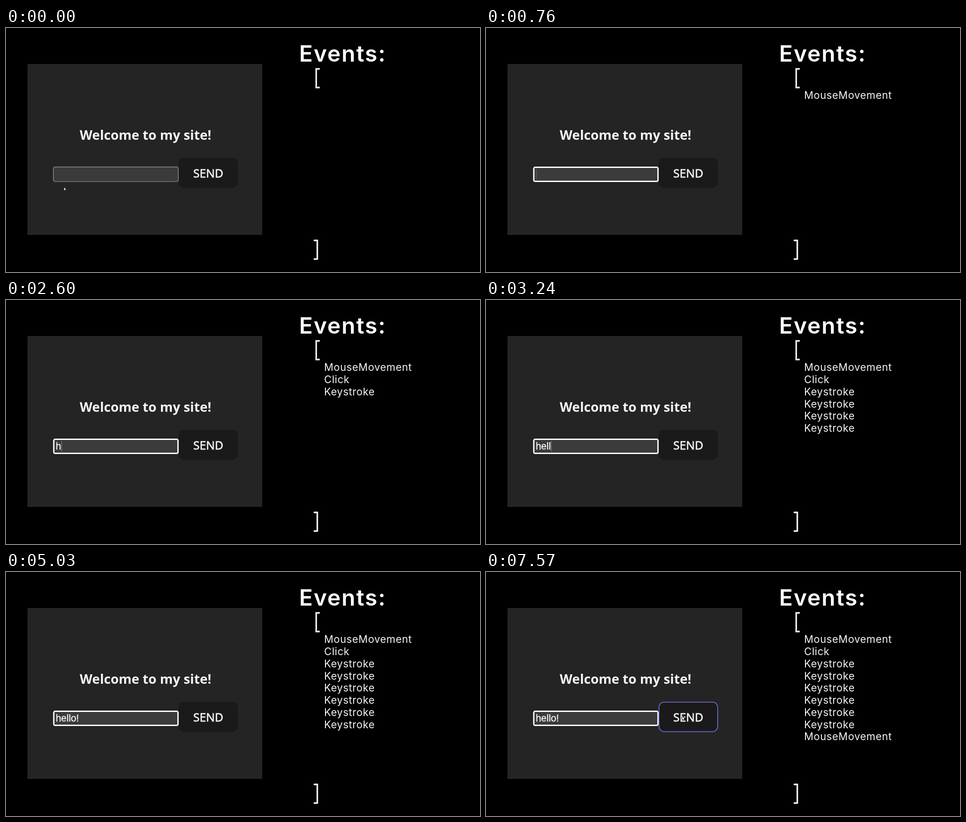
Recreate the animation shown at these times as an HTML page with a canvas. Size 1043 by 537 pixels, loop 8 s.

```html
<!DOCTYPE html>
<html lang="en">
<head>
<meta charset="utf-8">
<title>Event log</title>
<style>
html, body { margin: 0; width: 100%; height: 100%; overflow: hidden; background: #000; }
canvas { display: block; }
</style>
</head>
<body>
<canvas id="stage" width="1043" height="537"></canvas>
<script>
const ctx = document.getElementById('stage').getContext('2d');
const LOOP = 8000;
const STEP = 75;
const FOCUS_AT = 760;
const HOVER_AT = 6930;

const typed = 'hello!';
const keyTimes = [2600, 2750, 2890, 3240, 3660, 3930];
const events = [
  ['MouseMovement', 200],
  ['Click', 900],
  ...keyTimes.map(time => ['Keystroke', time]),
  ['MouseMovement', 7070]
];
const caretSpans = [[760, 1790], [2600, 5030], [6100, 7170]];

const clamp = v => Math.min(1, Math.max(0, v));
const smooth = v => v * v * (3 - 2 * v);
const mix = (a, b, p) => a + (b - a) * p;

function text(string, x, y, font, { color = '#f4f4f4', spacing = 0, align = 'left', bolder = 0 } = {}) {
  ctx.font = font;
  ctx.letterSpacing = spacing + 'px';
  ctx.textAlign = align;
  ctx.fillStyle = ctx.strokeStyle = color;
  ctx.fillText(string, x, y);
  if (bolder) {
    ctx.lineWidth = bolder;
    ctx.lineJoin = 'round';
    ctx.strokeText(string, x, y);
  }
}

function roundBox(x, y, w, h, r, fill, stroke, lineWidth = 1) {
  ctx.beginPath();
  ctx.roundRect(x, y, w, h, r);
  if (fill) {
    ctx.fillStyle = fill;
    ctx.fill();
  }
  if (stroke) {
    ctx.strokeStyle = stroke;
    ctx.lineWidth = lineWidth;
    ctx.stroke();
  }
}

function bracket(spineX, tipX, top, bottom) {
  ctx.strokeStyle = '#f4f4f4';
  ctx.lineWidth = 3.4;
  ctx.lineJoin = 'miter';
  ctx.beginPath();
  ctx.moveTo(tipX, top);
  ctx.lineTo(spineX, top);
  ctx.lineTo(spineX, bottom);
  ctx.lineTo(tipX, bottom);
  ctx.stroke();
}

function polygon(points, x, y) {
  ctx.fillStyle = '#eee';
  ctx.beginPath();
  points.forEach(([dx, dy]) => ctx.lineTo(x + dx, y + dy));
  ctx.fill();
}

const drawArrow = (x, y) =>
  polygon([[-1, -3], [3, 1], [1.4, 1.6], [2, 3], [1, 3.2], [0.3, 2], [-1, 3]], x, y);

function drawHand(x, y) {
  ctx.fillStyle = '#111';
  ctx.beginPath();
  ctx.ellipse(x + 0.3, y + 0.5, 3, 4, 0, 0, Math.PI * 2);
  ctx.fill();
  polygon([[-1, -4], [0.2, -4], [0.3, -1], [3, 0], [2.5, 4], [-0.5, 4], [-2.5, 0.5], [-1, 0.8]], x, y);
}

function drawField(t) {
  if (t < FOCUS_AT) {
    roundBox(104.3, 305.8, 274.8, 32.2, 4, '#3b3b3b', '#a2a2a2', 1.2);
  } else {
    roundBox(102.5, 304, 278, 36, 5, '#1c1c1c');
    roundBox(105.1, 306.6, 273.4, 30.9, 3, '#3b3b3b', '#fafafa', 3);
  }
  const value = typed.slice(0, keyTimes.filter(time => t >= time).length);
  text(value, 109.5, 329.3, '21.3px "Liberation Sans", Arial, sans-serif', { color: '#fafafa', bolder: 0.3 });
  if (caretSpans.some(([on, off]) => t >= on && t < off)) {
    ctx.fillStyle = value ? '#8c8c8c' : '#6a6a6a';
    ctx.fillRect(110 + ctx.measureText(value).width, 310.5, 1.1, 23);
  }
}

function drawButton(t) {
  roundBox(380, 285.5, 130, 66.5, 12, '#1a1a1a');
  if (t >= HOVER_AT) {
    const glow = mix(0.12, 1, smooth(clamp((t - HOVER_AT) / 350)));
    roundBox(380.6, 286.3, 129.2, 65, 11.5, null, `rgba(104,109,214,${glow})`, 1.8);
  }
  text('SEND', 445, 329, '500 25.5px "Open Sans", "Noto Sans", sans-serif',
    { align: 'center', bolder: 0.8 });
}

function drawPointer(t) {
  if (t < 270) {
    const p = t < 130 ? 0 : smooth(clamp((t - 60) / 210));
    drawArrow(mix(129, 126, p), mix(354, 322, p));
  } else if (t >= HOVER_AT) {
    const held = Math.floor((t - HOVER_AT) / STEP) * STEP;
    drawHand(mix(403, 433, smooth(clamp(held / 560))), 321);
  }
}

function draw(t) {
  ctx.fillStyle = '#000';
  ctx.fillRect(0, 0, 1043, 537);
  roundBox(48, 80, 515, 374.5, 0, '#242424', '#303030');
  text('Welcome to my site!', 307, 246.3, 'bold 28.8px "Noto Sans", "Open Sans", sans-serif',
    { align: 'center' });
  drawField(t);
  drawButton(t);
  drawPointer(t);

  text('Events:', 645, 74, '600 49.5px Inter, sans-serif', { color: '#fff', spacing: 2 });
  bracket(682.6, 690.5, 90, 131);
  bracket(685, 677, 467.5, 508.5);
  events.forEach(([name, time], row) => {
    if (t >= time) text(name, 700, 156.4 + row * 26.75, '22.5px Inter, sans-serif', { spacing: 0.7 });
  });
}

const start = performance.now();
function tick() {
  draw((performance.now() - start) % LOOP);
  requestAnimationFrame(tick);
}
tick();
</script>
</body>
</html>
```
